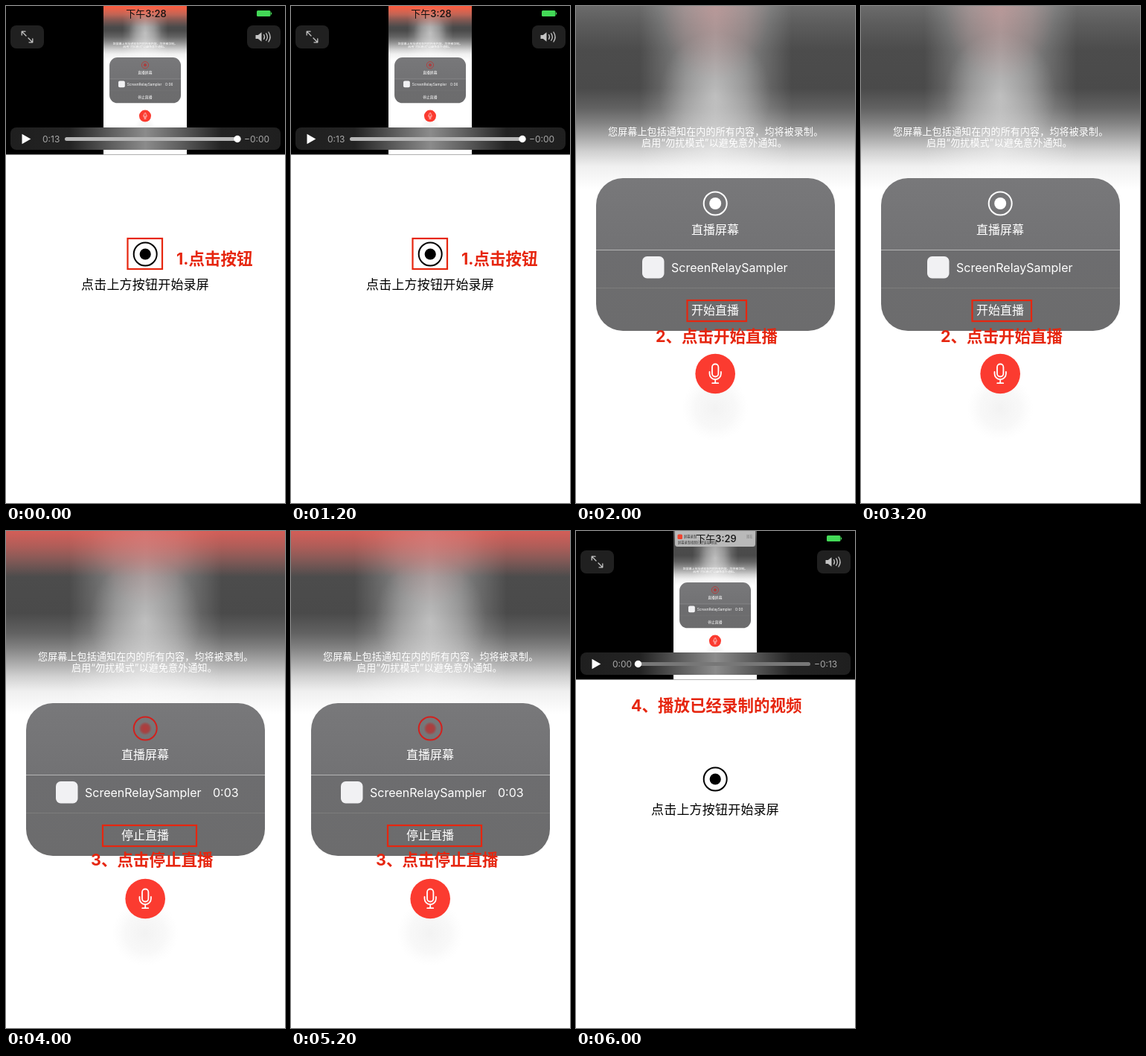
Animation, 375 px wide and 667 px high, one loop 8000 ms. Source, as an HTML page:

```html
<!DOCTYPE html>
<html lang="zh-CN">
<head>
<meta charset="utf-8">
<title>录屏步骤</title>
<style>
  html, body { margin: 0; width: 100%; height: 100%; overflow: hidden; background: #fff; }
  svg { display: block; width: 100vw; height: 100vh; }
  text { font-family: Inter, "Noto Sans CJK SC", "Noto Sans CJK", sans-serif; }
  .scene { visibility: hidden; animation: show 8s step-end infinite; }
  .s1 { animation-delay: -8s; }
  .s2 { animation-delay: -6s; }
  .s3 { animation-delay: -4s; }
  .s4 { animation-delay: -2s; }
  @keyframes show {
    0% { visibility: visible; }
    25%, 100% { visibility: hidden; }
  }
  .note { font-size: 21.5px; font-weight: 700; fill: #e6260f; }
  .frame { fill: none; stroke: #e6260f; stroke-width: 2.2; }
  .tip { font-size: 13px; letter-spacing: .15px; fill: #fff; }
  .label { font-size: 16px; fill: #fff; }
  .strong { font-weight: 500; }
  .time { font-size: 12px; fill: #a8a8a8; }
  .clock { font-size: 13px; font-weight: 500; fill: #111; text-anchor: middle; }
  .line { fill: none; stroke-linecap: round; stroke-linejoin: round; }
</style>
</head>
<body>
<svg viewBox="0 0 375 667" preserveAspectRatio="none">
  <defs>
    <linearGradient id="shade" x2="0" y2="1">
      <stop offset="0" stop-color="#6b6b6b"/>
      <stop offset=".1" stop-color="#5c5c5c"/>
      <stop offset=".24" stop-color="#4c4c4c"/>
      <stop offset=".45" stop-color="#4a4a4a"/>
      <stop offset=".56" stop-color="#626262"/>
      <stop offset=".64" stop-color="#828282"/>
      <stop offset=".72" stop-color="#a9a9a9"/>
      <stop offset=".8" stop-color="#d2d2d2"/>
      <stop offset=".88" stop-color="#f0f0f0"/>
      <stop offset="1" stop-color="#fff"/>
    </linearGradient>
    <linearGradient id="beam">
      <stop offset="0" stop-color="#fff" stop-opacity="0"/>
      <stop offset=".3" stop-color="#fff" stop-opacity=".3"/>
      <stop offset=".5" stop-color="#fff" stop-opacity=".42"/>
      <stop offset=".7" stop-color="#fff" stop-opacity=".3"/>
      <stop offset="1" stop-color="#fff" stop-opacity="0"/>
    </linearGradient>
    <radialGradient id="bloom">
      <stop offset="0" stop-color="#fff" stop-opacity=".36"/>
      <stop offset=".5" stop-color="#fff" stop-opacity=".2"/>
      <stop offset="1" stop-color="#fff" stop-opacity="0"/>
    </radialGradient>
    <linearGradient id="glow" x2="0" y2="1">
      <stop offset="0" stop-color="#ee5a52" stop-opacity=".8"/>
      <stop offset=".35" stop-color="#e65c54" stop-opacity=".58"/>
      <stop offset="1" stop-color="#d8655c" stop-opacity="0"/>
    </linearGradient>
    <linearGradient id="ember" x2="0" y2="1">
      <stop offset="0" stop-color="#ff5a3c"/>
      <stop offset=".4" stop-color="#ee6a54" stop-opacity=".7"/>
      <stop offset="1" stop-color="#c06a60" stop-opacity="0"/>
    </linearGradient>
    <radialGradient id="blush">
      <stop offset="0" stop-color="#d08080" stop-opacity=".4"/>
      <stop offset="1" stop-color="#d08080" stop-opacity="0"/>
    </radialGradient>
    <radialGradient id="smudge">
      <stop offset="0" stop-color="#d8d8d8" stop-opacity=".32"/>
      <stop offset=".6" stop-color="#e4e4e4" stop-opacity=".25"/>
      <stop offset="1" stop-color="#eee" stop-opacity="0"/>
    </radialGradient>
    <radialGradient id="pulse">
      <stop offset="0" stop-color="#b33a3a"/>
      <stop offset=".6" stop-color="#a34444"/>
      <stop offset="1" stop-color="#a34444" stop-opacity="0"/>
    </radialGradient>
    <linearGradient id="sheet" x2="0" y2="1">
      <stop offset="0" stop-color="#78787a"/>
      <stop offset=".47" stop-color="#727274"/>
      <stop offset=".47" stop-color="#6d6d6f"/>
      <stop offset="1" stop-color="#6c6c6d"/>
    </linearGradient>
    <linearGradient id="bar">
      <stop offset="0" stop-color="#1f1f1f"/>
      <stop offset=".22" stop-color="#232323"/>
      <stop offset=".38" stop-color="#616161"/>
      <stop offset=".5" stop-color="#8b8b8b"/>
      <stop offset=".62" stop-color="#616161"/>
      <stop offset=".78" stop-color="#232323"/>
      <stop offset="1" stop-color="#1f1f1f"/>
    </linearGradient>
    <clipPath id="thumbBox"><rect x="131" width="112" height="199.4"/></clipPath>

    <g id="backdrop">
      <rect width="375" height="667" fill="#fff"/>
      <rect width="375" height="245" fill="url(#shade)"/>
      <rect x="85" width="205" height="245" fill="url(#beam)"/>
      <ellipse cx="187" cy="120" rx="75" ry="85" fill="url(#bloom)"/>
    </g>

    <g id="panel">
      <text class="tip" x="43" y="173">您屏幕上包括通知在内的所有内容，均将被录制。</text>
      <text class="tip" x="88" y="188">启用“勿扰模式”以避免意外通知。</text>
      <rect x="27" y="231" width="321" height="205" rx="36" fill="url(#sheet)"/>
      <path d="M27 327.5H348" stroke="#b4b4b4"/>
      <path d="M27 378.5H348" stroke="#7d7d7d"/>
      <text class="label strong" x="155" y="305.5">直播屏幕</text>
      <ellipse cx="187" cy="540" rx="45" ry="44" fill="url(#smudge)"/>
      <circle cx="187.2" cy="493.5" r="26.8" fill="#fb3b30"/>
      <g class="line" stroke="#fff" stroke-width="1.8">
        <rect x="183" y="480.5" width="8.4" height="17" rx="4.2"/>
        <path d="M179.5 491v2.5a7.7 7.7 0 0 0 15.4 0V491M187.2 501.2v5M183.2 506.2h8"/>
      </g>
    </g>

    <g id="app">
      <rect y="336" width="29.5" height="29.5" rx="6.5" fill="#f1f1f3"/>
      <text class="label" x="39" y="357">ScreenRelaySampler</text>
    </g>

    <g id="live">
      <use href="#panel"/>
      <circle cx="187.2" cy="265" r="15.5" fill="none" stroke="#d3201d" stroke-width="2"/>
      <circle cx="187.2" cy="265" r="9" fill="url(#pulse)"/>
      <use href="#app" x="67"/>
      <text class="label" x="155" y="413.5">停止直播</text>
    </g>

    <g id="controls">
      <rect x="6" y="26" width="45" height="31" rx="8" fill="#202020"/>
      <rect x="324" y="26" width="45" height="31" rx="8" fill="#202020"/>
      <g class="line" stroke="#c4c4c4" stroke-width="1.3">
        <path d="M27 40l-5.5-5.5M21.2 39v-4.8h4.8M30 43l5.5 5.5M35.8 44v4.8H31"/>
        <path d="M346.5 38.5q2 3 0 6M349.7 36.8q3.2 4.7 0 9.4M352.9 35q4.4 6.5 0 13"/>
      </g>
      <path d="M335.5 39h3.3l4.7-3.8v12.6l-4.7-3.8h-3.3z" fill="#c4c4c4"/>
      <rect x="337" y="6" width="18.5" height="8" rx="1.5" fill="#43d957"/>
      <rect x="356" y="8.5" width="1.2" height="3" rx=".6" fill="#43d957"/>
      <rect x="6" y="163" width="363" height="30" rx="8" fill="url(#bar)"/>
      <path d="M21.5 171.8L33.3 178.5L21.5 185.2Z" fill="#fff"/>
    </g>

    <g id="home">
      <circle cx="187.2" cy="333" r="15.5" fill="none" stroke="#000" stroke-width="2"/>
      <circle cx="187.2" cy="333" r="7.6"/>
      <text x="101" y="380" font-size="17" letter-spacing=".2">点击上方按钮开始录屏</text>
    </g>
  </defs>

  <g class="scene s1">
    <rect width="375" height="667" fill="#fff"/>
    <rect width="375" height="199.4"/>
    <g clip-path="url(#thumbBox)">
      <g transform="translate(131) scale(.299)">
        <use href="#backdrop"/>
        <rect width="375" height="95" fill="url(#ember)"/>
        <use href="#live"/>
        <text class="label" x="278" y="357">0:06</text>
      </g>
    </g>
    <use href="#controls"/>
    <text class="clock" x="188.5" y="15">下午3:28</text>
    <text class="time" x="49" y="183">0:13</text>
    <rect x="79" y="176" width="236" height="5" rx="2.5" fill="#b6b6b6"/>
    <circle cx="311" cy="178.5" r="4.7" fill="#fff"/>
    <text class="time" x="320" y="183">−0:00</text>
    <use href="#home"/>
    <rect class="frame" x="163.5" y="312" width="46.5" height="41"/>
    <text class="note" x="229" y="346.5">1.点击按钮</text>
  </g>

  <g class="scene s2">
    <use href="#backdrop"/>
    <ellipse cx="187" cy="0" rx="75" ry="100" fill="url(#blush)"/>
    <use href="#panel"/>
    <circle cx="187.2" cy="265" r="15.5" fill="none" stroke="#fff" stroke-width="2"/>
    <circle cx="187.2" cy="265" r="8" fill="#fff"/>
    <use href="#app" x="89"/>
    <text class="label" x="155" y="413.5">开始直播</text>
    <rect class="frame" x="149.5" y="395" width="79.5" height="28"/>
    <text class="note" x="107" y="451">2、点击开始直播</text>
  </g>

  <g class="scene s3">
    <use href="#backdrop"/>
    <rect width="375" height="62" fill="url(#glow)"/>
    <ellipse cx="187" cy="0" rx="75" ry="100" fill="url(#blush)"/>
    <use href="#live"/>
    <text class="label" x="278" y="357">0:03</text>
    <rect class="frame" x="130" y="395" width="126" height="28"/>
    <text class="note" x="114" y="449">3、点击停止直播</text>
  </g>

  <g class="scene s4">
    <rect width="375" height="667" fill="#fff"/>
    <rect width="375" height="199.4"/>
    <g clip-path="url(#thumbBox)">
      <g transform="translate(131) scale(.299)">
        <use href="#backdrop"/>
        <use href="#live"/>
        <text class="label" x="278" y="357">0:00</text>
      </g>
      <rect x="133" y="-4" width="108" height="25" rx="3.5" fill="#b9b9b9"/>
      <rect x="136.5" y="4.5" width="6.5" height="6.5" rx="1.5" fill="#f0442f"/>
      <g font-size="4.3" fill="#333">
        <text x="145" y="9.4">屏幕录制</text>
        <text x="229" y="9.4" fill="#777">现在</text>
        <text x="137" y="17.4">屏幕录制视频已经链接 预览</text>
      </g>
    </g>
    <use href="#controls"/>
    <text class="clock" x="188.5" y="15">下午3:29</text>
    <text class="time" x="49" y="183">0:00</text>
    <rect x="79" y="176" width="236" height="5" rx="2.5" fill="#777"/>
    <circle cx="83.5" cy="178.5" r="4.7" fill="#fff"/>
    <text class="time" x="320" y="183">−0:13</text>
    <text class="note" x="74" y="241.5">4、播放已经录制的视频</text>
    <use href="#home"/>
  </g>
</svg>
</body>
</html>
```
